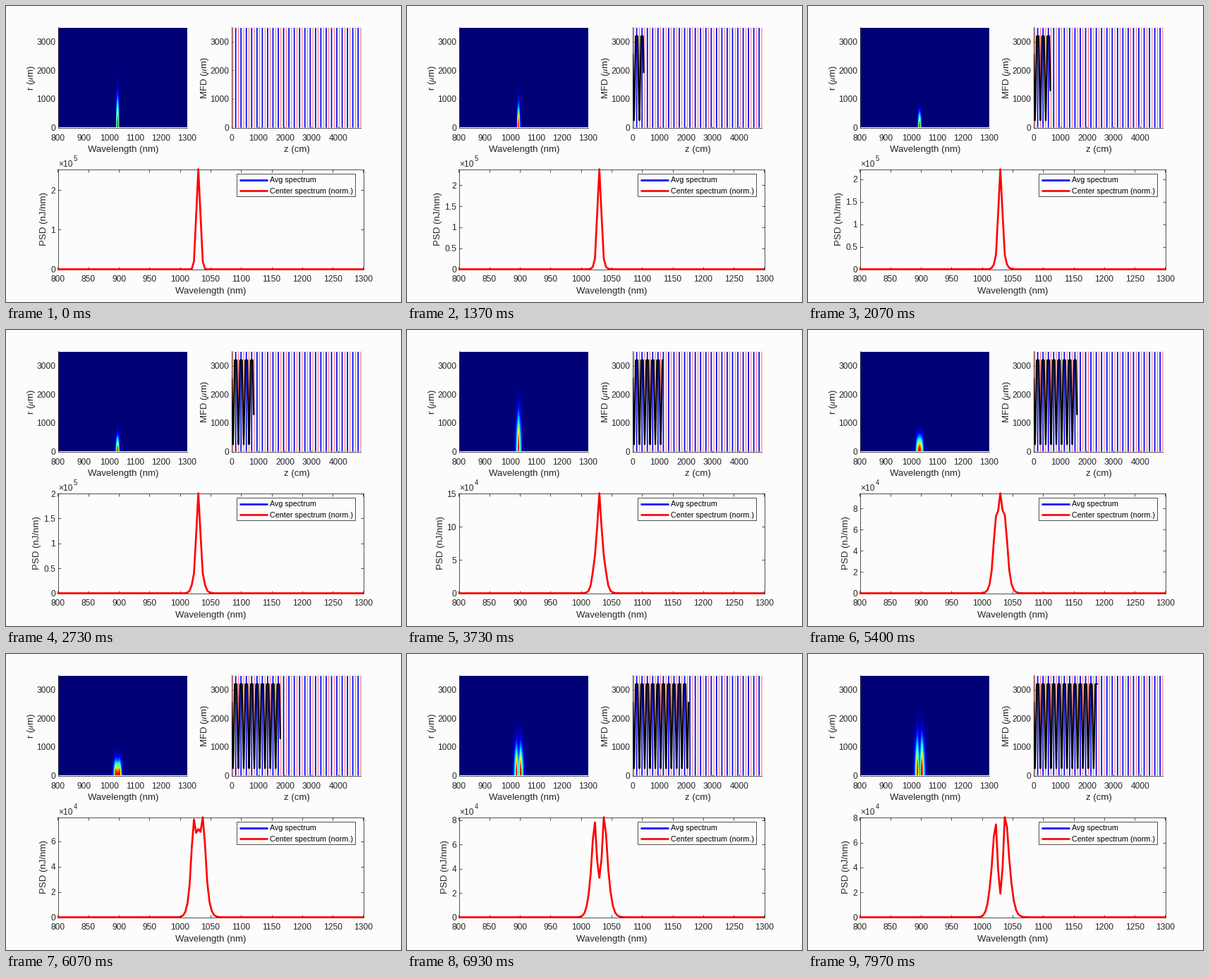
A matplotlib script that plays this animation: 560 px wide and 420 px high, repeating every 8000 ms.

```python
import numpy as np
import matplotlib.pyplot as plt
from matplotlib.animation import FuncAnimation
from matplotlib.colors import LinearSegmentedColormap
from matplotlib.patches import Rectangle

W, H, DPI = 560, 420, 100
FRAMES, INTERVAL = 250, 32         # one loop of 8000 ms
STEPS = 240                        # saved positions along the path
PX = 72 / DPI                      # points per pixel
INK, PAPER = "#262626", "#fcfcfc"

plt.rcParams.update({
    "font.family": "Liberation Sans",
    "mathtext.fontset": "stix",
    "text.color": INK,
    "axes.edgecolor": INK,
    "axes.linewidth": 0.8 * PX,
    "axes.facecolor": PAPER,
})

# Beam path: a 200 cm period of 20 steps, with the focus 50 cm in
CYCLE, FOCUS, LENGTH = 200, 50, 4850
cycle, phase = np.divmod(np.arange(STEPS), 20)
local = np.where(phase <= 9, 12.5 * phase, 112.5 + 7.5 * (phase - 9))
z = CYCLE * cycle + local
mfd = np.minimum(np.hypot(255, 50.9 * (local - FOCUS)), 3200)

# Nonlinear phase builds up at each focus
passes = cycle + 0.5 + np.arctan((local - FOCUS) / 5) / np.pi
phi = 0.345 * passes

# Self-phase modulation of a Gaussian pulse
k = np.arange(83, -61, -1)
lam = np.clip(299792.458 / (291.06 + 1.0175 * k), 800, 1300)
t = np.linspace(-6, 6, 401)
dft = np.exp(1j * 0.794 * np.outer(k, t)) * (t[1] - t[0])


def spectrum(p):
    pulse = np.exp(-t**2 / 2 + 1j * p * np.exp(-t**2))
    tilt = np.exp(-6.4e-5 * p**4 * np.clip(k, -12, 12))
    return 2.525e5 * np.abs(dft @ pulse)**2 / (2 * np.pi) * tilt


fig = plt.figure(figsize=(W / DPI, H / DPI), dpi=DPI, facecolor=PAPER)


def panel(x, y, w, h, xticks, tick, pad, box=False):
    ax = fig.add_axes([x / W, 1 - (y + h) / H, w / W, h / H])
    ax.set_xticks(xticks)
    ax.tick_params(direction="in", length=tick * PX, width=0.8 * PX,
                   color=INK, labelcolor=INK, labelsize=12 * PX,
                   top=box, right=box)
    ax.tick_params(axis="x", pad=pad * PX)
    ax.tick_params(axis="y", pad=3.5 * PX)
    ax.spines[["top", "right"]].set_visible(box)
    return ax


# Radial map
heat = panel(73.5, 30.5, 183, 142, range(800, 1301, 100), 0, 9.5)
jet = LinearSegmentedColormap.from_list("beam", [
    (0, (0, 0, 0.47)), (0.125, (0, 0, 1)), (0.375, (0, 1, 1)),
    (0.625, (1, 1, 0)), (0.875, (1, 0, 0)), (1, (0.5, 0, 0))])
cols = 800 + 500 * (np.arange(183) + 0.5) / 183
rows = 3500 * (np.arange(142) + 0.5) / 142
image = heat.imshow(np.zeros((142, 183)), cmap=jet, vmin=0, vmax=1,
                    extent=(800, 1300, 0, 3500), origin="lower",
                    aspect="auto", interpolation="nearest")
heat.set_yticks(range(0, 3001, 1000))

# Beam size along the path
beam = panel(320, 30.5, 183, 142, range(0, 4001, 1000), 2, 9.5)
beam.set_xlim(0, LENGTH)
beam.set_ylim(0, 3500)
beam.set_yticks(range(0, 3001, 1000))
beam.vlines(np.arange(FOCUS, LENGTH + 1, CYCLE), 0, 3500, color="red",
            lw=0.6 * PX, snap=False, clip_on=False)
beam.vlines(np.arange(FOCUS + CYCLE / 2, LENGTH, CYCLE), 0, 3500,
            color="blue", lw=1.7 * PX, snap=False)
trail, = beam.plot([], [], color="black", lw=2.2 * PX, zorder=3,
                   solid_joinstyle="round", solid_capstyle="round")

# Spectrum: both curves coincide, so only the upper one is drawn
spec = panel(73.5, 231.5, 433, 142, range(800, 1301, 50), 4.3, 8.5, box=True)
spec.set_xlim(800, 1300)
curve, = spec.plot([], [], color="red", lw=2.67 * PX, zorder=3,
                   clip_on=False, solid_joinstyle="round",
                   solid_capstyle="butt")

# Labels and legend in pixel coordinates
over = fig.add_axes([0, 0, 1, 1], zorder=5)
over.set_xlim(0, W)
over.set_ylim(H, 0)
over.axis("off")


def label(x, y, s, size=13.2, **kw):
    return over.text(x, y, s, fontsize=size * PX, **kw)


def ylabel(x, y, s):
    return label(x, y, s, rotation=90, ha="center", va="center")


for x, y, s in ((166, 207.5, "Wavelength (nm)"), (412, 207.5, "z (cm)"),
                (290, 408, "Wavelength (nm)")):
    label(x, y, s, ha="center")
ylabel(36, 102, r"r ($\mu$m)")
ylabel(282, 102, r"MFD ($\mu$m)")
psd = ylabel(54.5, 302, "PSD (nJ/nm)")
label(74, 228, "×10", 12)
power = label(96, 220, "5", 9.6)

over.add_patch(Rectangle((327, 237.5), 168, 32, fc=PAPER, ec=INK,
                         lw=0.8 * PX))
for y, c, s in ((246.5, "blue", "Avg spectrum"),
                (261.5, "red", "Center spectrum (norm.)")):
    over.plot([330.5, 370.5], [y, y], color=c, lw=2.67 * PX,
              solid_capstyle="butt")
    label(373.5, y + 4, s, 10.8, color="black")


def scale(top):
    step = next(s for s in (1e4, 2e4, 5e4, 1e5) if top / s <= 5)
    ticks = step * np.arange(int(top / step) + 1)
    exp = 5 if ticks[-1] >= 2e5 else 4
    names = [f"{v / 10**exp:g}" for v in ticks]
    spec.set_ylim(0, top)
    spec.set_yticks(ticks, names)
    power.set_text(str(exp))
    psd.set_x({1: 54.5, 2: 47.5, 3: 43.5}[max(map(len, names))])


def update(frame):
    # position reached by the end of the frame
    i = (frame * INTERVAL + 30) * STEPS // (FRAMES * INTERVAL)
    s = spectrum(phi[i])
    curve.set_data(lam, s)
    scale(s.max())
    radial = np.exp(-8 * (rows / mfd[i])**2)
    image.set_data(np.outer(radial, np.interp(cols, lam, s) / s.max()))
    trail.set_data(z[:i + 1], mfd[:i + 1])
    return [curve, image, trail, psd, power]


anim = FuncAnimation(fig, update, frames=FRAMES, interval=INTERVAL,
                     init_func=lambda: update(0), repeat=True,
                     repeat_delay=0)
plt.show()
```
